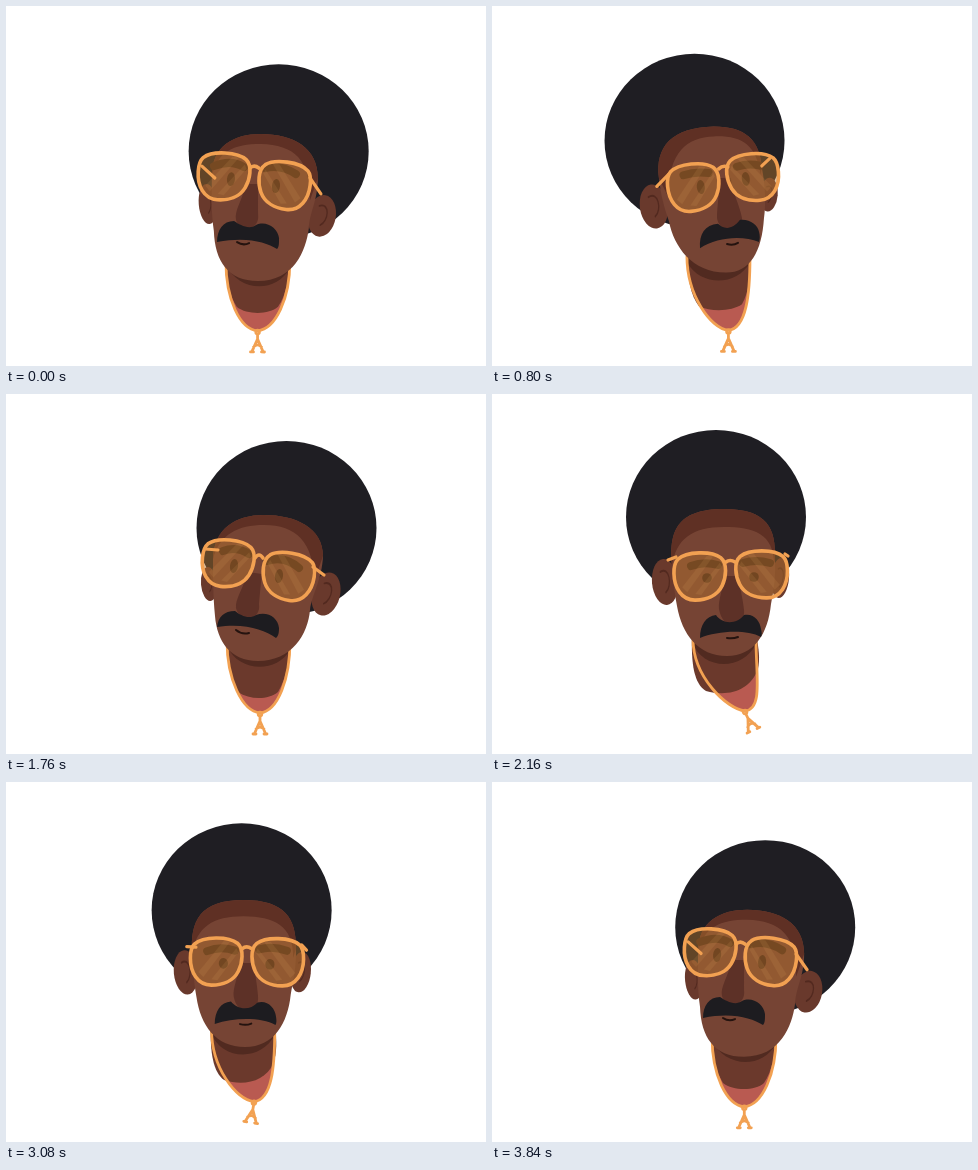
An HTML page that plays this animation: 480x360 px, repeating every 3880 ms.

```html
<!DOCTYPE html>
<html lang="en">
<head>
<meta charset="utf-8">
<title>Head bob</title>
<style>
  html, body { margin: 0; width: 100%; height: 100%; overflow: hidden; background: #fff; }
  svg { display: block; width: 480px; height: 360px; }
  .line { fill: none; stroke-linecap: round; stroke-linejoin: round; }
  .gold { stroke: #f2a152; }
</style>
</head>
<body>
<svg viewBox="0 0 480 360">
  <defs>
    <path id="frame" d="M-22 -17 C-13 -25 12 -25 21 -18 C28 -12 26 2 22 10 C17 20 6 24 -5 24 C-19 24 -26 11 -26 -3 C-26 -9 -25 -14 -22 -17 Z"/>
    <g id="lens">
      <use href="#frame" fill="#b4742e" fill-opacity=".45"/>
      <path d="M-18 11 L7 -20 L14 -20 L-13 16 Z M-5 18 L20 -13 L22 -9 L1 19 Z" fill="#e0a35c" opacity=".13"/>
      <use href="#frame" class="line gold" stroke-width="3.6"/>
    </g>
    <g id="ear">
      <circle r="1" fill="#69392c"/>
      <path d="M-.3 -.45 C.45 -.7 .55 .2 0 .45" class="line" stroke="#52291f" stroke-width=".09"/>
    </g>
  </defs>
  <path id="loop" fill="#b95a51"/>
  <path id="neck" fill="#6b392c"/>
  <path id="shade" fill="#512a20"/>
  <path id="chain" class="line gold" stroke-width="2.8"/>
  <g id="pendant" class="line gold" stroke-width="2.8">
    <circle r="1.8"/>
    <path d="M0 3 V7 M-7 20 H-4 M4 20 H7 M-5.5 19.5 L0 7 L5.5 19.5 M-4 15 Q0 11 4 15"/>
  </g>
  <circle id="hair" r="1" fill="#1f1e23"/>
  <use id="earL" href="#ear"/>
  <use id="earR" href="#ear"/>
  <path id="face" fill="#764434"/>
  <path id="band" fill="#5f3024"/>
  <path id="nose" fill="#5d3127"/>
  <circle id="eyeL" r="1" fill="#3c2118"/>
  <circle id="eyeR" r="1" fill="#3c2118"/>
  <path id="browL" class="line" stroke="#442719" stroke-width="8"/>
  <path id="browR" class="line" stroke="#442719" stroke-width="8"/>
  <path id="stache" fill="#1d1c20"/>
  <path id="mouth" class="line" stroke="#24130f" stroke-width="2"/>
  <use id="lensL" href="#lens"/>
  <use id="lensR" href="#lens"/>
  <path id="bridge" class="line gold" stroke-width="3.6"/>
  <path id="armL" class="line gold" stroke-width="3.2"/>
  <path id="armR" class="line gold" stroke-width="3.2"/>
</svg>
<script>
const LOOP = 3880, CYCLE = LOOP / 2, STEP = 40;
const $ = id => document.getElementById(id);

// Each part in four poses: right low, right high, centre, left.
const shapes = {
  neck: [
    'M220 250 C220 275 224 290 231 301 C241 309 263 309 272 301 C280 290 284 270 284 250 Z',
    'M221 245 C221 270 224 285 232 298 C244 306 262 306 272 298 C280 285 284 265 284 245 Z',
    'M200 240 C199 270 202 290 214 297 C236 303 258 297 266 275 C268 265 267 255 264 240 Z',
    'M195 245 C195 272 199 290 207 300 C220 306 240 305 250 298 C257 285 259 270 258 245 Z'],
  shade: [
    'M220 258 C232 286 270 288 284 262 L284 245 L220 245 Z',
    'M221 252 C232 278 270 280 284 256 L284 240 L221 240 Z',
    'M200 248 C210 276 250 278 264 250 L264 238 L200 238 Z',
    'M195 256 C210 281 245 279 258 256 L258 240 L195 240 Z'],
  face: [
    'M206 170 C206 140 228 128 255 128 C288 128 312 142 312 172 C312 195 304 205 303 222 C300 245 288 275 252 275 C222 275 209 255 208 225 C205 205 206 190 206 170 Z',
    'M207 165 C208 134 230 121 258 121 C290 121 317 134 317 162 C316 186 306 200 304 216 C302 240 286 267 252 267 C224 267 211 247 209 222 C207 200 207 185 207 165 Z',
    'M180 172 C177 138 184 115 232 115 C276 115 284 135 283 165 C284 180 282 195 279 210 C276 240 262 262 235 262 C206 262 190 240 185 212 C182 195 181 185 180 172 Z',
    'M167 172 C163 140 180 121 222 120 C254 120 268 134 270 160 C274 180 274 200 272 212 C270 245 258 266 234 266 C200 266 182 240 177 215 C172 200 169 190 167 172 Z'],
  band: [
    'M206 170 C206 140 228 128 255 128 C288 128 312 142 312 172 L304 195 C305 153 288 139 255 138 C228 138 212 145 206 170 Z',
    'M207 165 C208 134 230 121 258 121 C290 121 317 134 317 162 L308 188 C308 148 290 131 258 131 C232 131 214 140 207 165 Z',
    'M180 172 C177 138 184 115 232 115 C276 115 284 135 283 165 L282 170 C282 140 262 133 232 133 C200 133 184 145 180 172 Z',
    'M167 172 C163 140 180 121 222 120 C254 120 268 134 270 160 L269 168 C264 138 250 129 222 130 C195 131 177 145 176 190 Z'],
  nose: [
    'M240 178 C236 195 228 205 230 214 C232 221 238 223 243 222 C250 221 253 215 252 208 C252 195 252 185 252 178 Z',
    'M242 178 C237 195 229 205 230 214 C232 222 238 225 243 224 C251 223 254 217 253 210 C254 197 255 188 256 180 Z',
    'M232 182 C231 196 226 206 227 215 C229 226 234 230 240 230 C248 230 253 224 252 216 C251 205 248 196 247 182 Z',
    'M228 172 C227 190 225 203 225 212 C226 220 232 224 239 223 C247 223 251 219 250 212 C248 200 241 188 239 172 Z'],
  stache: [
    'M211 236 C211 224 217 215 228 215 C234 219 243 224 250 219 C260 214 272 222 273 232 C273 238 273 241 271 243 C260 236 240 230 211 236 Z',
    'M211 233 C212 223 218 217 229 217 C234 221 243 226 250 221 C262 217 272 224 273 234 C273 240 272 242 270 244 C258 236 240 229 211 233 Z',
    'M208 244 C208 231 214 222 224 221 C230 230 244 231 252 221 C262 219 268 227 269 235 C270 239 270 241 269 243 C254 235 225 237 208 244 Z',
    'M208 242 C207 228 213 219 226 218 C231 223 240 225 248 214 C258 213 266 219 267 226 C268 230 268 233 267 236 C250 229 225 231 208 242 Z'],
  mouth: ['M231 236 Q237 240 243 237', 'M230 236 Q236 241 243 239', 'M235 244 Q241 245 246 243', 'M235 238 Q241 240 246 237'],
  browL: ['M208 160 Q225 153 238 161', 'M217 157 Q230 152 243 160', 'M199 172 Q212 167 226 171', 'M192 169 Q204 165 217 167'],
  browR: ['M259 162 Q275 158 290 168', 'M261 167 Q278 161 293 174', 'M251 169 Q264 165 278 169', 'M245 161 Q257 157 268 160'],
  bridge: ['M244 162 Q248 158 253 162', 'M249 164 Q253 158 257 164', 'M234 168 Q238 165 243 168', 'M227 163 Q231 159 236 161'],
  armL: ['M196 160 L209 172', 'M199 155 L212 156', 'M176 166 L184 163', 'M165 180 L177 167'],
  armR: ['M304 172 L315 188', 'M307 173 L318 181', 'M293 160 L296 162', 'M270 160 L278 152']
};

// x, y, angle, width, height in the same four poses
const placed = {
  hair: [[273, 145.5, 0, 90, 87], [280.5, 134, 0, 90, 87], [224, 123, 0, 90, 87], [203, 134, 0, 90, 87]],
  earL: [[202, 198, -5, 9, 20], [203, 190, -5, 8, 17], [173, 188, -5, 13, 23], [162, 200, -8, 14, 22]],
  earR: [[316, 210, 10, 14, 21], [320, 200, 14, 14, 22], [288, 184, 5, 9, 20], [277, 188, 5, 9, 17]],
  eyeL: [[225, 173, 6, 4, 7], [228, 172, 8, 4, 7], [215, 184, 0, 4.8, 4.8], [209, 181, -6, 4, 7]],
  eyeR: [[270, 180, 6, 4, 7], [273, 182, 8, 4, 7], [262, 183, 0, 4.8, 4.8], [254, 173, -6, 4, 7]],
  lensL: [[218, 170, 4, 1, 1], [222, 169, 6, 1, 1], [208, 182, -1, 1, 1], [202, 181, -5, 1, 1]],
  lensR: [[278, 179, 7, -1, 1], [282, 182, 9, -1, 1], [269.5, 180, -1, -1, 1], [261, 171, -5, -1, 1]]
};
const ends = [[220, 255, 284, 255], [221, 247, 284, 247], [201, 245, 264, 245], [195, 250, 258, 250]];

// time, four pose weights, ring x and y, pendant angle
const keys = [
  [-20, 1, 0, 0, 0, 252, 326, 0],
  [80, .85, 0, .15, 0, 250, 325, 3],
  [150, .45, .05, .5, 0, 251, 321, -10],
  [220, 0, 0, 1, 0, 253, 318, -25],
  [300, 0, 0, .2, .8, 245, 323, -12],
  [390, .85, -.85, 0, 1, 236, 331, 5],
  [530, 0, 0, 0, 1, 235, 327, 4],
  [670, -.85, .85, 0, 1, 237, 321, -2],
  [790, 0, 0, 0, 1, 236.5, 325, 0],
  [950, .85, -.85, 0, 1, 234, 331, 0],
  [1040, .5, -.5, .3, .7, 237, 328, 6],
  [1120, .2, 0, .8, 0, 246, 321, 10],
  [1240, .8, 0, .2, 0, 256, 320, 0],
  [1360, 1, 0, 0, 0, 259, 323, -6],
  [1500, 0, 1, 0, 0, 256, 320, -8],
  [1640, -.7, 1.7, 0, 0, 255, 317, -3],
  [1760, 0, 1, 0, 0, 254, 320, 0]
];

const mix = (poses, w) => poses[0].map((_, i) => poses.reduce((s, p, k) => s + p[i] * w[k], 0));
const numbers = /-?\d+(\.\d+)?/g;
const paths = Object.entries(shapes).map(([id, list]) => ({
  el: $(id), form: list[0], poses: list.map(d => d.match(numbers).map(Number))
}));
const bodies = Object.entries(placed).map(([id, poses]) => ({ el: $(id), poses }));

function keyAt(i) {
  const n = keys.length, lap = Math.floor(i / n);
  const [t, ...v] = keys[i - lap * n];
  return { t: t + lap * CYCLE, v };
}

// Smooth cyclic curve through the keys
function sample(t) {
  if (t >= CYCLE + keys[0][0]) t -= CYCLE;
  let i = keys.length - 1;
  while (keys[i][0] > t) i--;
  const [p, a, b, q] = [i - 1, i, i + 1, i + 2].map(keyAt);
  const h = b.t - a.t, u = (t - a.t) / h;
  const slope = (l, m, r, k) => {
    const d0 = (m.v[k] - l.v[k]) / (m.t - l.t), d1 = (r.v[k] - m.v[k]) / (r.t - m.t);
    return d0 * d1 > 0 ? 2 * d0 * d1 / (d0 + d1) : 0;
  };
  return a.v.map((y, k) => {
    const m0 = slope(p, a, b, k) * h, m1 = slope(a, b, q, k) * h, d = b.v[k] - y;
    return y + u * (m0 + u * (3 * d - 2 * m0 - m1 + u * (m0 + m1 - 2 * d)));
  });
}

function draw(t) {
  const v = sample(t), w = v.slice(0, 4), [x, y, angle] = v.slice(4);
  for (const { el, form, poses } of paths) {
    const n = mix(poses, w);
    let i = 0;
    el.setAttribute('d', form.replace(numbers, () => n[i++].toFixed(2)));
  }
  for (const { el, poses } of bodies) {
    const [cx, cy, r, sx, sy] = mix(poses, w);
    el.setAttribute('transform', `translate(${cx} ${cy}) rotate(${r}) scale(${sx} ${sy})`);
  }
  const [x0, y0, x1, y1] = mix(ends, w);
  const d = `M${x0} ${y0} C${x0} ${y0 + 38} ${x - 18} ${y - 3} ${x} ${y - 1} C${x + 18} ${y - 3} ${x1} ${y1 + 38} ${x1} ${y1}`;
  $('loop').setAttribute('d', d);
  $('chain').setAttribute('d', d);
  $('pendant').setAttribute('transform', `translate(${x} ${y}) rotate(${angle})`);
}

function tick() {
  const t = Math.floor(performance.now() % LOOP / STEP) * STEP;
  draw(t % CYCLE);
  requestAnimationFrame(tick);
}
tick();
</script>
</body>
</html>
```
